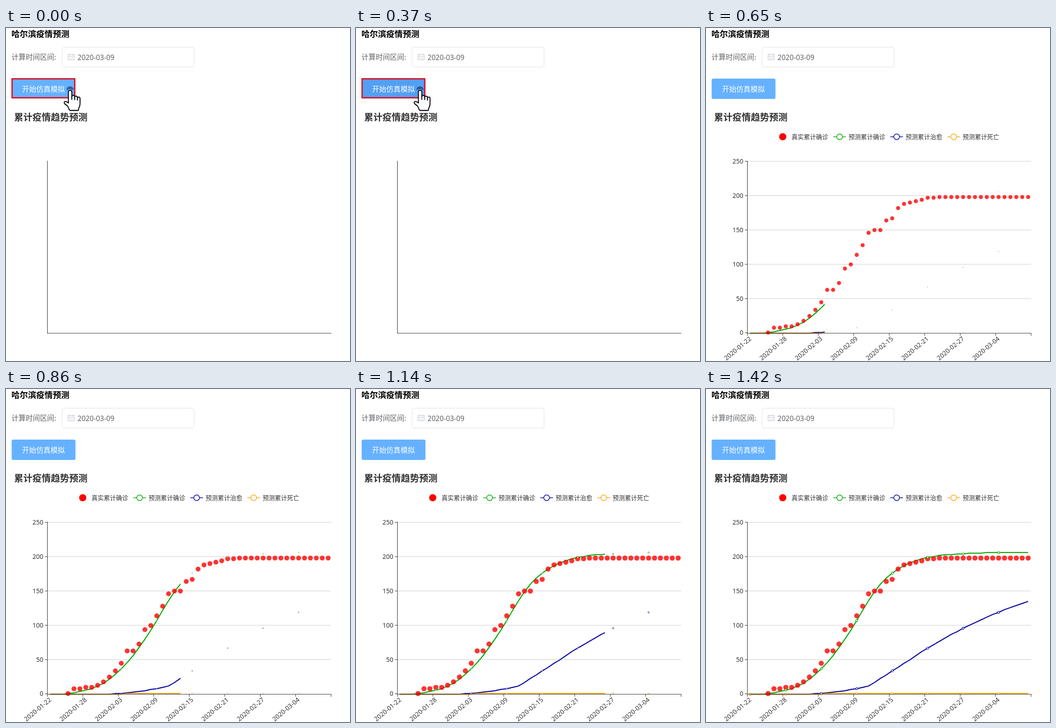
Animation, 760 px wide and 737 px high, one loop 2070 ms. Source, as an HTML page:

```html
<!DOCTYPE html>
<html lang="zh-CN">
<head>
<meta charset="utf-8">
<title>疫情预测</title>
<style>
html, body { margin: 0; width: 100%; height: 100%; overflow: hidden; background: #fff; }
svg { display: block; width: 760px; height: 737px; --dot: 0px; --sym: 0; }
text { font-family: "Noto Sans CJK SC", "Noto Sans CJK", sans-serif; }
.num { font-family: "Noto Sans", "Open Sans", sans-serif; font-size: 14px; fill: #333; }
.key { font-size: 13.5px; fill: #333; }
.line { fill: none; stroke-width: 2.25; stroke-linejoin: bevel; }
.dot { r: var(--dot); fill: #f00; opacity: .8; }
.sym { r: calc(var(--sym) * 2.25px); stroke-width: calc(var(--sym) * 1.125px); fill: #fff; }
.axis { stroke: #333; stroke-width: 1.1; fill: none; }
</style>
</head>
<body>
<svg viewBox="0 0 760 737">
  <defs><clipPath id="wipe"><rect id="wipeBox" x="91" y="280" width="0" height="410"/></clipPath></defs>

  <text x="12" y="19.6" font-size="18.3" font-weight="700">哈尔滨疫情预测</text>
  <text x="12" y="70" font-size="15.75" fill="#606266">计算时间区间:</text>
  <rect x="124" y="42.5" width="291.5" height="44" rx="4.5" fill="#fff" stroke="#dcdfe6"/>
  <g fill="none" stroke="#c0c4cc">
    <path d="M137 58.5h14v12h-14zM137 62.5h14M140.5 56.5v4M147.5 56.5v4"/>
    <path d="M139.5 65.5h9.5M139.5 68h9.5" stroke-dasharray="2 1.7"/>
  </g>
  <text class="num" x="158" y="70.6" style="font-size:15.6px;fill:#606266">2020-03-09</text>

  <rect id="button" x="12.5" y="112" width="141" height="45" rx="3.5"/>
  <text x="35.5" y="141" font-size="15.75" fill="#fff">开始仿真模拟</text>
  <text x="18" y="204.6" font-size="20.25" font-weight="700" fill="#333">累计疫情趋势预测</text>

  <g id="pointer">
    <path d="M11 155.8h145v2h-145z" fill="#fff"/>
    <rect x="13.4" y="112.4" width="138.4" height="42" fill="none" stroke="#e60a17" stroke-width="2.8"/>
    <g stroke="#15151f" stroke-width="2.3" stroke-linecap="round" stroke-linejoin="round" fill="none">
      <path d="M134.8 136a6.8 6.8 0 0 1 13.4 0M138 135.5a3.8 3.8 0 0 1 7 0" stroke="#1b2c4e" stroke-width="1.8"/>
      <path fill="#fff" d="M137.8 166V142q0-4.2 3.8-4.2t3.8 4.2v10q0-3 3.2-3t3.2 3.4v1q0-2.6 3-2.6t3 3.4v1q0-2.4 2.9-2.4t2.9 3.6V167q0 5-2 8.5-1.5 2.5-1.5 5.5 0 1.5-1.5 1.5H142q-1.5 0-2.2-1.5-1-3.5-4-8.5l-6.3-5q-2-3.5.5-4.7 3-1.2 7.8 3.2z"/>
      <path d="M145.4 151v7M151.8 153v5.5M157.8 155v4.5"/>
    </g>
  </g>

  <g id="chart">
    <g id="grid" stroke="#ccc" stroke-width="1.1"></g>
    <g id="lines" clip-path="url(#wipe)"></g>
    <g id="marks"></g>
    <g id="legend"></g>
  </g>
  <path class="axis" d="M91.5 294V676M91 675.5H718.5"/>
</svg>

<script>
const LOOP = 2070, STEP = 70, PRESS = 230, SHOW = 440, END = 1420;
const DAYS = 48, BAND = 13.06, LEFT = 91.4;
const $ = id => document.getElementById(id);
const X = i => LEFT + BAND * (i + .5);
const Y = v => 675.5 - 1.522 * v;

function add(parent, tag, attrs, text) {
  const el = document.createElementNS("http://www.w3.org/2000/svg", tag);
  for (const k in attrs) el.setAttribute(k, attrs[k]);
  if (text) el.textContent = text;
  parent.appendChild(el);
}

// Short lists keep their last value up to the final day.
const fill = list => Array.from({ length: DAYS }, (_, i) => list[Math.min(i, list.length - 1)]);

const actual = [1, 8, 8, 10, 10, 13, 18, 25, 34, 45, 63, 63, 73, 94, 100, 114, 128, 146,
  150, 150, 164, 167, 182, 188, 190, 192, 194, 197, 197, 198];
const series = [
  { name: "预测累计确诊", color: "#00aa00", data: fill([0, 0, 0, 1, 2, 4, 6, 8, 12, 16, 22, 29, 37,
    46, 56, 68, 80, 93, 107, 122, 136, 149, 160, 169, 176, 182, 187, 191, 194, 197, 199, 200,
    202, 203, 203, 204, 204, 205, 205, 205, 206]) },
  { name: "预测累计治愈", color: "#00009c", data: Array(11).fill(0).concat([1, 1, 2, 3, 4, 5, 7, 8,
    10, 12, 17, 23, 28, 34, 39, 45, 50, 56, 62, 67, 72, 77, 82, 87, 91, 96, 100, 104, 108, 112,
    116, 119, 123, 126, 129, 132, 135]) },
  { name: "预测累计死亡", color: "#f5a911", data: fill(Array(13).fill(0).concat(1)) }
];

// Axes, ticks and labels
for (let v = 0; v <= 250; v += 50) {
  const y = Math.round(Y(v) - .1) + (v ? 0 : -.5);
  if (v) add($("grid"), "path", { d: `M92 ${y}H718.5` });
  add($("grid"), "path", { class: "axis", d: `M86 ${y}H91.5` });
  add($("grid"), "text", { class: "num", x: 82.5, y: y + 4.5, "text-anchor": "end", stroke: "none" }, String(v));
}
for (let i = 0; i <= DAYS; i += 6) {
  const x = LEFT + BAND * i;
  add($("grid"), "path", { class: "axis", d: `M${x} 675.5v5.5` });
  if (i === DAYS) break;
  const date = new Date(Date.UTC(2020, 0, 22 + i)).toISOString().slice(0, 10);
  add($("grid"), "text", { class: "num", "text-anchor": "end", stroke: "none", y: 5,
    transform: `translate(${X(i)} 685.5) rotate(-40)` }, date);
}

// Marks lie above all lines
for (let i = 3; i < DAYS; i++) {
  const v = actual[Math.min(i - 3, actual.length - 1)];
  add($("marks"), "circle", { class: "dot", cx: X(i), cy: Y(v) });
}
add($("legend"), "circle", { cx: 169.5, cy: 240.7, r: 7.9, fill: "#f00" });
add($("legend"), "text", { class: "key", x: 189, y: 245.5 }, "真实累计确诊");
series.forEach(({ name, color, data }, n) => {
  add($("lines"), "polyline", { class: "line", stroke: color, points: data.map((v, i) => [X(i), Y(v)]).join(" ") });
  for (let i = 0; i < DAYS; i += 6)
    add($("marks"), "circle", { class: "sym", cx: X(i), cy: Y(data[i]), stroke: color });
  const x = 295.2 + 126 * n;
  add($("legend"), "path", { d: `M${x - 14} 240.7h28`, stroke: color, "stroke-width": 1.5 });
  add($("legend"), "circle", { cx: x, cy: 240.7, r: 6.3, fill: "#fff", stroke: color, "stroke-width": 1.5 });
  add($("legend"), "text", { class: "key", x: x + 19.8, y: 245.5 }, name);
});

const pressed = ["#5aa8fa", "#4a9af0", "#529ff4"];
const root = document.querySelector("svg");

function draw(time) {
  const n = Math.floor((time - PRESS) / STEP);
  const t = Math.min(END, PRESS + n * STEP);
  const on = t >= SHOW;
  const p = Math.max(0, Math.min(1, (t - 360) / (END - 360)));
  $("chart").style.display = on ? "" : "none";
  $("pointer").style.display = on ? "none" : "";
  $("button").setAttribute("fill", pressed[n] || "#66b1ff");
  $("wipeBox").setAttribute("width", Math.max(0, 89 + .5875 * (t - 510)));
  root.style.setProperty("--dot", 5.65 * (1 - (1 - p) ** 5) + "px");
  root.style.setProperty("--sym", p);
}

const start = performance.now();
function tick() {
  draw((performance.now() - start) % LOOP);
  requestAnimationFrame(tick);
}
tick();
</script>
</body>
</html>
```
